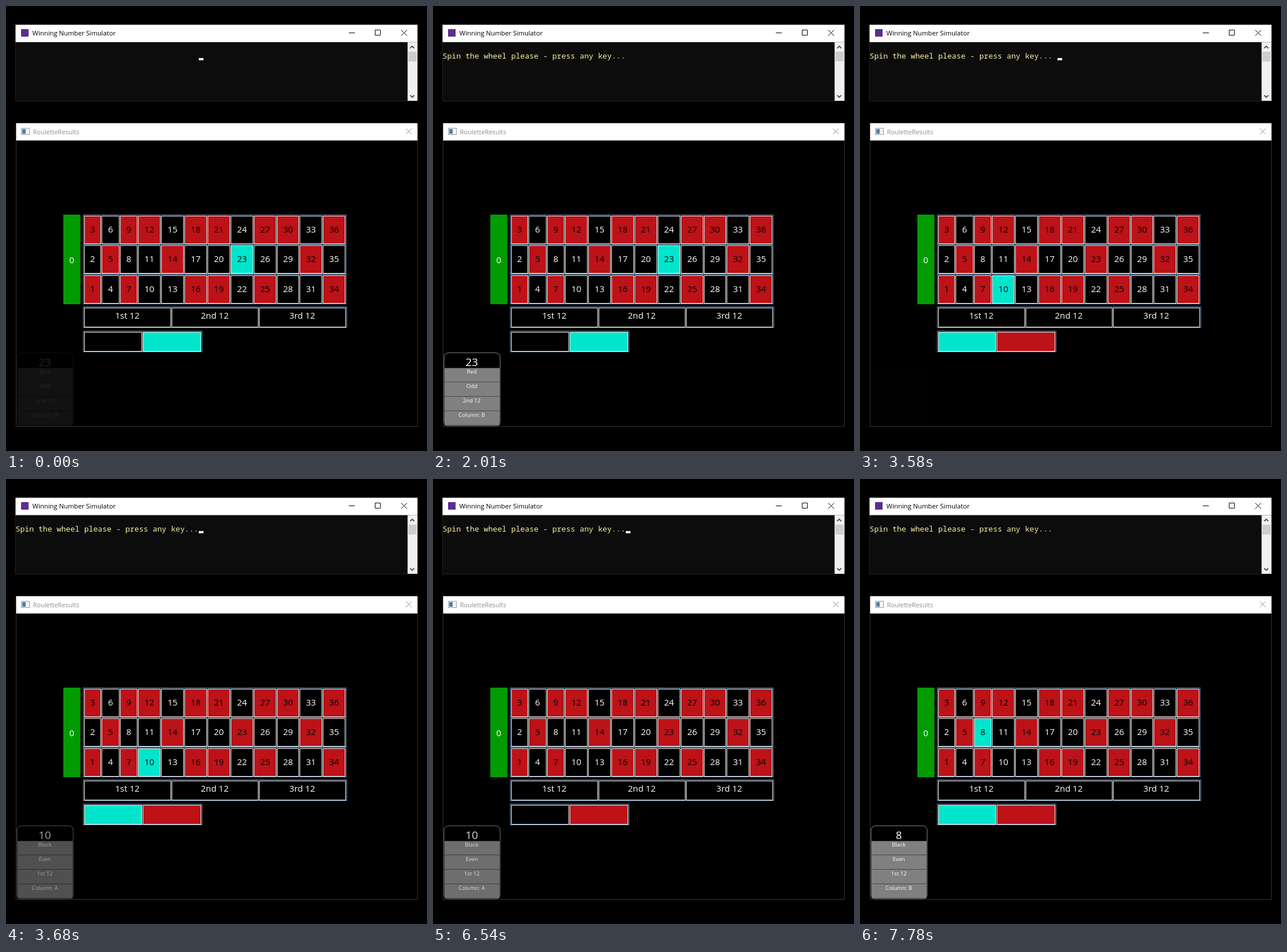
An HTML page that plays this animation: 727x770 px, repeating every 8 s.

```html
<!DOCTYPE html>
<html lang="en">
<head>
<meta charset="utf-8">
<title>Roulette results</title>
<style>
  html, body { margin: 0; width: 100%; height: 100%; overflow: hidden; background: #000; }
  svg { display: block; width: 727px; height: 770px; }
  text { font: 500 15px "Open Sans", "Noto Sans", sans-serif; fill: #fff; text-anchor: middle; }
  .title { font-size: 11.3px; fill: #000; text-anchor: start; }
  .idle { font-size: 11px; fill: #8c8c8c; }
  .prompt { font: 500 13.17px "Noto Sans Mono", monospace; fill: #f9f1a5; text-anchor: start; }
  .win { font-size: 18.7px; }
  .fact { font-size: 9.5px; }
  .line { fill: none; stroke: #000; }
  .grey { stroke: #8f8f8f; }
  .arrow { stroke: #505050; stroke-width: 1.8; }

  .prompt, .cursor, .nudge, .hit { animation: 8s step-end infinite; }
  .prompt { animation-name: prompt; }
  .cursor { animation-name: blink; }
  .nudge { animation-name: nudge; }
  .hit.a { animation-name: hitA; }
  .hit.b { animation-name: hitB; }
  .hit.c { animation-name: hitC; }
  .card { animation: 8s linear infinite; }
  .card.a { animation-name: cardA; }
  .card.b { animation-name: cardB; }
  .card.c { animation-name: cardC; }

  @keyframes prompt {
    0%, 88% { opacity: 0; }
    .25%, 88.25%, 100% { opacity: 1; }
  }
  @keyframes blink {
    0%, 18.75%, 31.75%, 44.75%, 64.5%, 77.625%, 87.75% { opacity: 1; }
    12.125%, 25.125%, 38.25%, 58.25%, 71.125%, 84.125%, 97.25%, 100% { opacity: 0; }
  }
  @keyframes nudge {
    0%, 45%, 88%, 100% { transform: translateX(0); }
    44.75%, 87.75% { transform: translateX(8px); }
  }
  @keyframes hitA { 0% { opacity: 1; } 37.75%, 100% { opacity: 0; } }
  @keyframes hitB { 0%, 81.75%, 100% { opacity: 0; } 44.75% { opacity: 1; } }
  @keyframes hitC { 0% { opacity: 0; } 87.75%, 100% { opacity: 1; } }
  @keyframes cardA {
    0% { opacity: .14; }
    2.75%, 37.5% { opacity: 1; }
    39.75%, 100% { opacity: 0; }
  }
  @keyframes cardB {
    0%, 44.75%, 84.25%, 100% { opacity: 0; }
    46.75%, 81.375% { opacity: 1; }
  }
  @keyframes cardC {
    0%, 87.75% { opacity: 0; }
    89.625%, 100% { opacity: 1; }
  }
</style>
</head>
<body>
<svg viewBox="0 0 727 770">
  <rect width="727" height="770"/>

  <!-- console window -->
  <rect x="16.5" y="32.5" width="694" height="132" fill="#0c0c0c" stroke="#222"/>
  <rect x="16.5" y="32.5" width="694" height="30" fill="#fff"/>
  <rect x="26" y="40" width="13" height="13" fill="#5c2d91"/>
  <text class="title" x="45.5" y="51">Winning Number Simulator</text>
  <path class="line" d="M592 46.5h10.5M637.5 41.5h9v9h-9z"/>
  <path class="line" d="M682.5 41.5l10 10m0-10l-10 10"/>
  <rect x="693.5" y="62.5" width="17" height="101.5" fill="#f0f0f0"/>
  <rect x="695" y="79" width="14" height="17" fill="#cdcdcd"/>
  <path class="line arrow" d="M698 73l3.5-3.5 3.5 3.5M698 154.5l3.5 3.5 3.5-3.5"/>
  <text class="prompt" x="16.5" y="91">Spin the wheel please - press any key...</text>
  <g class="nudge"><rect class="cursor" x="333" y="90" width="8" height="4" fill="#f2f2f2"/></g>

  <!-- results window -->
  <rect x="17.5" y="203.5" width="693" height="524" stroke="#333"/>
  <rect x="17.5" y="202.7" width="693" height="30" fill="#fff"/>
  <rect x="26.5" y="211.5" width="14" height="11" fill="#f4f4f4" stroke="#9a9a9a"/>
  <rect x="28" y="213" width="6" height="8" fill="#4f7fa8"/>
  <text class="title idle" x="46.5" y="221.5">RouletteResults</text>
  <path class="line grey" d="M690.5 212l10 10m0-10l-10 10"/>
  <rect x="99" y="361" width="29.5" height="155" fill="#029b02"/>
  <text x="113.5" y="445">0</text>
  <g id="board"></g>
</svg>
<script>
  const NS = 'http://www.w3.org/2000/svg';
  const RED = '#bc1218', CYAN = '#00e6cc', BLACK = '#000';
  const board = document.getElementById('board');

  function add(parent, tag, attrs, text) {
    const el = document.createElementNS(NS, tag);
    for (const key in attrs) el.setAttribute(key, attrs[key]);
    if (text !== undefined) el.textContent = text;
    return parent.appendChild(el);
  }

  function box(parent, x, y, width, height, fill, stroke = '#fff') {
    add(parent, 'rect', { x: x + .5, y: y + .5, width: width - 1, height: height - 1, fill, stroke });
  }

  function label(parent, x, y, text, attrs) {
    add(parent, 'text', { x, y, ...attrs }, text);
  }

  function frame(y, width, height) {
    box(board, 133, y, width, height, BLACK, '#688caf');
  }

  // Cells sit inside a frame, each followed by a one pixel dark grid line.
  const edges = [135, 165, 197, 228, 268, 308, 348, 388, 428, 468, 507, 547, 587];
  const rows = [361, 412, 464];
  const reds = [1, 3, 5, 7, 9, 12, 14, 16, 18, 19, 21, 23, 25, 27, 30, 32, 34, 36];

  function numberCell(parent, n, fill) {
    const col = Math.ceil(n / 3) - 1;
    const y = rows[(3 - n % 3) % 3];
    const x = edges[col], w = edges[col + 1] - x - 1;
    box(parent, x, y + 2, w, 49, fill);
    label(parent, x + w / 2, y + 30.5, n, { style: `fill:${fill === BLACK ? '#fff' : BLACK}` });
  }

  function colorCell(parent, i, fill) {
    box(parent, 135 + i * 101, 564, 100 + i, 34, fill);
  }

  rows.forEach(y => frame(y, 455, 52));
  for (let n = 1; n <= 36; n++) numberCell(board, n, reds.includes(n) ? RED : BLACK);

  frame(520, 456, 37);
  ['1st 12', '2nd 12', '3rd 12'].forEach((text, i) => {
    const x = 135 + i * 151;
    box(board, x, 522, 150, 34, BLACK);
    label(board, x + 74.5, 541, text);
  });

  frame(562, 206, 37);
  colorCell(board, 0, BLACK);
  colorCell(board, 1, RED);

  function spin(name, n, facts) {
    const isRed = reds.includes(n);
    const hit = add(board, 'g', { class: 'hit ' + name });
    numberCell(hit, n, CYAN);
    colorCell(hit, isRed ? 1 : 0, CYAN);

    const card = add(board, 'g', { class: 'card ' + name });
    add(card, 'rect', { x: 19, y: 600, width: 97, height: 126.5, rx: 8, stroke: '#444', 'stroke-width': 2 });
    add(card, 'rect', { x: 20, y: 626, width: 95, height: 99.5, fill: '#808080' });
    label(card, 67, 622.5, n, { class: 'win' });
    facts.forEach((text, i) => {
      const y = 625.5 + i * 24.75;
      add(card, 'rect', { x: 20, y: Math.round(y), width: 95, height: 1, fill: '#4a4a4a' });
      label(card, 67, 636 + i * 25, text, { class: 'fact' });
    });
  }

  spin('a', 23, ['Red', 'Odd', '2nd 12', 'Column: B']);
  spin('b', 10, ['Black', 'Even', '1st 12', 'Column: A']);
  spin('c', 8, ['Black', 'Even', '1st 12', 'Column: B']);
</script>
</body>
</html>
```
